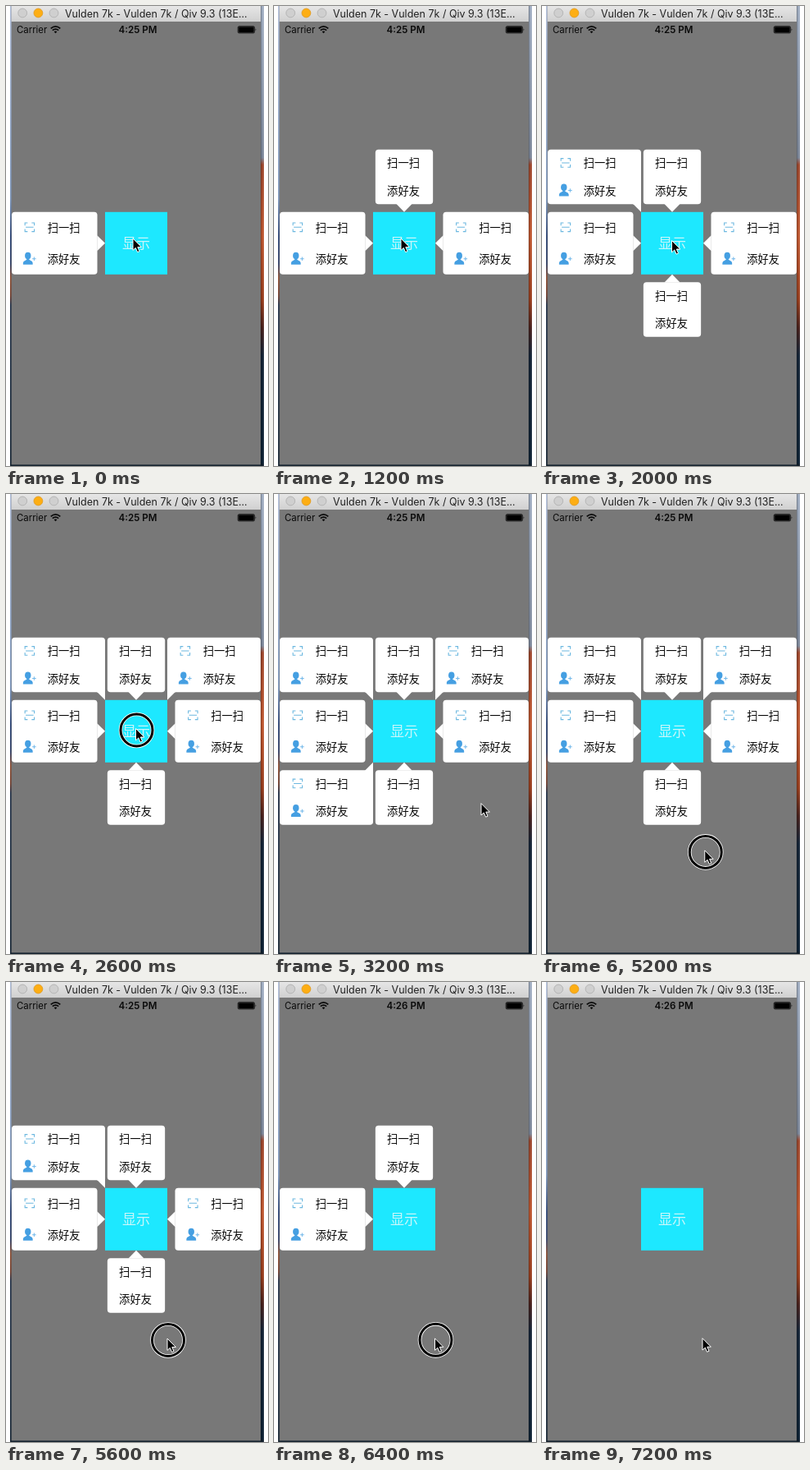
These frames come from a looping animation (320x560 px, 7.4 s). An HTML page:

```html
<!DOCTYPE html>
<html lang="zh-CN">
<head>
<meta charset="utf-8">
<title>Popup menu</title>
<style>
html, body { margin: 0; width: 100%; height: 100%; overflow: hidden; background: #fff; }
svg { display: block; width: 320px; height: 560px; }
.ui { font-family: Inter, "Liberation Sans", sans-serif; }
.cjk { font-family: "Noto Sans CJK SC", "Noto Sans CJK", "Noto Sans", sans-serif; }
.item { font-size: 14px; fill: #080808; }
</style>
</head>
<body>
<svg viewBox="0 0 320 560" xmlns="http://www.w3.org/2000/svg">
  <defs>
    <linearGradient id="bar" x2="0" y2="1">
      <stop offset="0" stop-color="#e6e6e6"/><stop offset="1" stop-color="#d0d0d0"/>
    </linearGradient>
    <linearGradient id="deskL" x2="0" y2="1">
      <stop offset="0" stop-color="#aebcd8"/><stop offset=".42" stop-color="#7d97bd"/>
      <stop offset=".5" stop-color="#2a4478"/><stop offset=".56" stop-color="#31416a"/>
      <stop offset=".59" stop-color="#8c4c30"/><stop offset=".63" stop-color="#6f3a2a"/>
      <stop offset=".65" stop-color="#1c2c44"/><stop offset="1" stop-color="#10202f"/>
    </linearGradient>
    <linearGradient id="deskR" x2="0" y2="1">
      <stop offset="0" stop-color="#a3b0c4"/><stop offset=".33" stop-color="#7f8a9c"/>
      <stop offset=".345" stop-color="#a04a30"/><stop offset=".5" stop-color="#c05a33"/>
      <stop offset=".64" stop-color="#9a4020"/><stop offset=".7" stop-color="#4a2420"/>
      <stop offset=".76" stop-color="#18283a"/><stop offset="1" stop-color="#102436"/>
    </linearGradient>
    <g id="scan" fill="none" stroke="#6cb8e0" stroke-width="1.15">
      <path d="M-6-2.2V-5.6H-2.6M2.6-5.6H6V-2.2M6 2.2V5.6H2.6M-2.6 5.6H-6V2.2M-5 0H5"/>
    </g>
    <g id="friend" fill="#459fe2">
      <ellipse cx="-2.2" cy="-3.6" rx="3.9" ry="4.5"/>
      <path d="M-8.4 7.8V5.6Q-8.4 3.4-5.4 2.5L-3.8 1.5V-1H-.6V1.5L1 2.5Q4 3.4 4 5.6V7.8Z"/>
      <path d="M3.4 .4H8.2M5.8-2V2.8" stroke="#74b9ea" stroke-width="1.1"/>
    </g>
  </defs>

  <rect x="5" width="155" height="560" fill="url(#deskL)"/>
  <rect x="160" width="155" height="560" fill="url(#deskR)"/>
  <rect x="5" y="557" width="310" height="3" fill="#14222f"/>
  <rect x="311" width="1.2" height="560" fill="#000" opacity=".25"/>
  <rect x="6.6" width="304.4" height="558.4" fill="#787878"/>
  <rect x="6.6" width="304.4" height="19" fill="url(#bar)"/>

  <g stroke-width=".9">
    <circle cx="20.2" cy="8.5" r="5.4" fill="#cfcfcf" stroke="#b0b0b0"/>
    <circle cx="39.4" cy="8.5" r="5.4" fill="#fdae14" stroke="#e09a20"/>
    <circle cx="58.5" cy="8.5" r="5.4" fill="#cfcfcf" stroke="#b0b0b0"/>
  </g>
  <g class="ui">
    <text x="72" y="13.5" font-size="12.5" fill="#222">Vulden 7k - Vulden 7k / Qiv 9.3 (13E...</text>
    <text x="13" y="33" font-size="11.4" fill="#0a0a0a">Carrier</text>
    <text id="clock" x="161" y="33" font-size="11.6" font-weight="600" text-anchor="middle" fill="#0a0a0a"></text>
  </g>
  <g fill="none" stroke="#0a0a0a" stroke-width="1.7">
    <path d="M54.7 27.4Q60.5 22.2 66.3 27.4M56.8 29.7Q60.5 26.4 64.2 29.7"/>
    <path d="M60.5 33.2L58.6 31.2Q60.5 29.6 62.4 31.2Z" fill="#0a0a0a" stroke="none"/>
  </g>
  <rect x="283.2" y="24.6" width="20.4" height="8.5" rx="1.7" fill="#303030" stroke="#0c0c0c" stroke-width=".6"/>
  <rect x="284.4" y="25.8" width="18" height="6.1" rx=".8" fill="#000"/>
  <path d="M304.6 27.2Q306.3 28.8 304.6 30.5Z" fill="#0c0c0c"/>

  <!-- 320 x 568 point screen -->
  <g transform="translate(7 19) scale(.95)">
    <rect x="120" y="244" width="80" height="80" fill="#1de8ff"/>
    <text class="cjk" x="160" y="290.8" font-size="18" font-weight="300" text-anchor="middle" fill="#c8f6fa">显示</text>
    <g id="menus"></g>
  </g>

  <g id="cursor">
    <g id="ring" fill="none">
      <circle cx="1" cy="2" r="19.5" stroke="#fff" stroke-width="4.6"/>
      <circle cx="1" cy="2" r="19.5" stroke="#000" stroke-width="3"/>
    </g>
    <path d="M0 0V14.4L3.3 11.4L5.6 16.6L8 15.6L5.8 10.5H10.4Z" fill="#000" stroke="#fff" stroke-width="1"/>
  </g>
</svg>
<script>
const LOOP = 7400, STEP = 200;
const $ = id => document.getElementById(id);

// box and arrow in points, then the first step on screen and the step it leaves
const menus = [
  { x: 0, y: 244, w: 110, h: 80, arrow: "109.8,274 120,284 109.8,294", icons: true, on: 0, off: 35 },
  { x: 123, y: 164, w: 74, h: 70, arrow: "150,233.8 160,244 170,233.8", on: 3, off: 34 },
  { x: 210, y: 244, w: 110, h: 80, arrow: "210.2,274 200,284 210.2,294", icons: true, on: 5, off: 32 },
  { x: 123, y: 334, w: 74, h: 70, arrow: "150,334.2 160,324 170,334.2", on: 8, off: 31 },
  { x: 0, y: 164, w: 120, h: 70, arrow: "110,234 120,244 120,229 110,229", icons: true, on: 10, off: 30 },
  { x: 200, y: 164, w: 120, h: 70, arrow: "210,234 200,244 200,229 210,229", icons: true, on: 12, off: 28 },
  { x: 0, y: 334, w: 120, h: 70, arrow: "110,334 120,324 120,339 110,339", icons: true, on: 14, off: 26 },
  { x: 200, y: 334, w: 120, h: 70, arrow: "210,334 200,324 200,339 210,339", icons: true, on: 17, off: 24 }
];

// step, x, y
const path = [
  [0, 155, 283], [6, 155, 283], [10, 158.5, 285.5], [13, 158.5, 285.5],
  [16, 253, 376.6], [18, 253, 376.6], [23, 202, 433.7], [28, 197, 434], [36, 196, 433.7]
];
const clicks = [2, 4, 7, 9, 11, 13, 24, 26, 28, 30, 32, 34];

function menuMarkup(m) {
  const row = (label, icon, k) => {
    const cy = m.y + m.h * k;
    const mark = m.icons ? `<use href="#${icon}" x="${m.x + 23}" y="${cy - .5}"/>` : "";
    return `${mark}<text class="cjk item" x="${m.x + (m.icons ? 46 : 15)}" y="${cy + 5.1}">${label}</text>`;
  };
  return `<g><rect x="${m.x}" y="${m.y}" width="${m.w}" height="${m.h}" rx="4" fill="#fff"/>
    <polygon points="${m.arrow}" fill="#fff"/>
    ${row("扫一扫", "scan", .25)}${row("添好友", "friend", .75)}</g>`;
}

$("menus").innerHTML = menus.map(menuMarkup).join("");
const nodes = [...$("menus").children];
const show = (el, on) => el.setAttribute("visibility", on ? "visible" : "hidden");

function cursorAt(s) {
  const i = Math.max(1, path.findIndex(p => p[0] >= s));
  const [s0, x0, y0] = path[i - 1], [s1, x1, y1] = path[i];
  const k = (s - s0) / (s1 - s0), e = k * k * (3 - 2 * k);
  return [x0 + (x1 - x0) * e, y0 + (y1 - y0) * e];
}

function draw(t) {
  const s = Math.floor((t % LOOP) / STEP);
  menus.forEach((m, i) => show(nodes[i], s >= m.on && s < m.off));
  $("cursor").setAttribute("transform", `translate(${cursorAt(s)})`);
  show($("ring"), clicks.includes(s));
  $("clock").textContent = s < 32 ? "4:25 PM" : "4:26 PM";
}

const start = performance.now();
function tick() {
  draw(performance.now() - start);
  requestAnimationFrame(tick);
}
tick();
</script>
</body>
</html>
```
